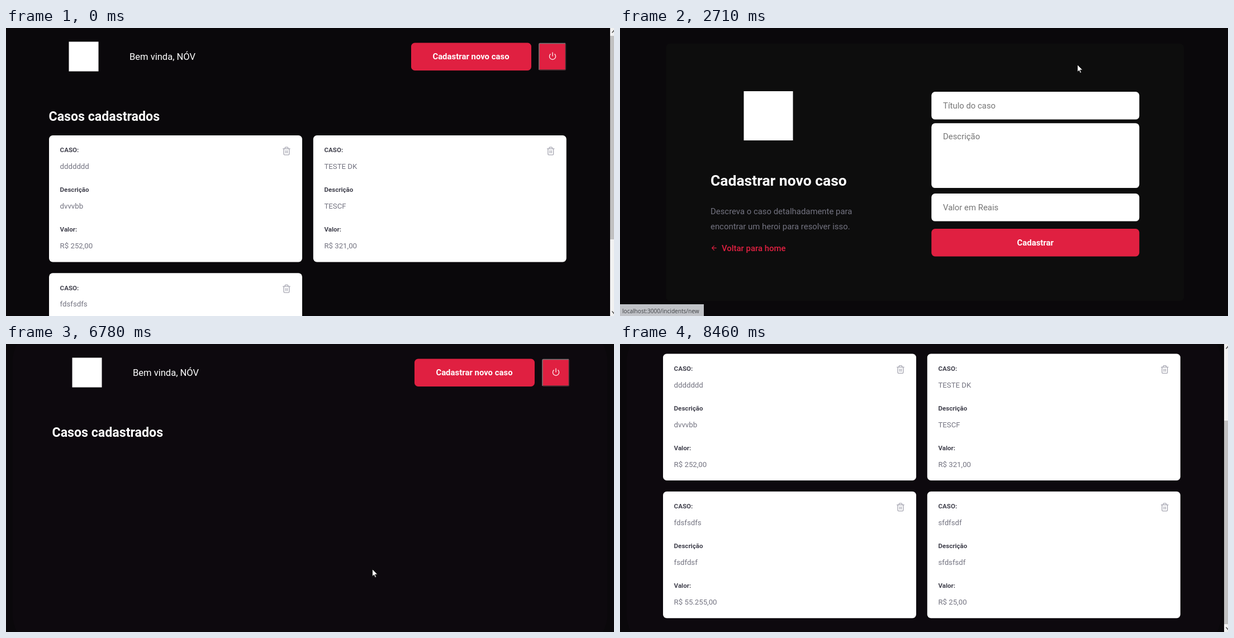
Write an HTML page that moves like this. It is 1088 px wide and 515 px high and loops after 9.42 s.

```html
<!DOCTYPE html>
<html lang="pt-BR">
<head>
<meta charset="utf-8">
<title>Casos cadastrados</title>
<style>
  html, body { margin: 0; width: 100%; height: 100%; overflow: hidden; background: #0a080b; }
  svg { display: block; }
  text { font-family: Roboto, sans-serif; font-size: 14.9px; fill: #fff; white-space: pre; }
  .bold { font-weight: 700; }
  .label { font-size: 11.58px; font-weight: 700; fill: #41414d; }
  .value { font-size: 13.23px; fill: #737380; }
  .icon { fill: none; stroke-width: 2; stroke-linecap: round; stroke-linejoin: round; }
  .red { fill: #e02041; }
  .cursor { fill: #fff; stroke: #111; stroke-width: 1; stroke-linejoin: round; }
</style>
</head>
<body>
<svg id="stage" width="1088" height="515" viewBox="0 0 1088 515"></svg>
<script>
const LOOP = 9420, FRAME = 78;
const OPEN_FORM = 2710, SUBMIT = 6780, LOADED = 6870;
const ICON = {
  trash: 'M3 6h18M19 6v14a2 2 0 0 1-2 2H7a2 2 0 0 1-2-2V6m3 0V4a2 2 0 0 1 2-2h4a2 2 0 0 1 2 2v2M10 11v6M14 11v6',
  power: 'M18.36 6.64a9 9 0 1 1-12.73 0M12 2v10',
  back: 'M19 12H5M12 19l-7-7 7-7'
};
const CASES = [
  ['ddddddd', 'dvvvbb', '252,00'],
  ['TESTE DK', 'TESCF', '321,00'],
  ['fdsfsdfs', 'fsdfdsf', '55.255,00'],
  ['sfdfsdf', 'sfdsfsdf', '25,00']
];

const text = (x, y, content, attrs = '') => `<text x="${x}" y="${y}" ${attrs}>${content}</text>`;
const box = (x, y, w, h, attrs = 'fill="#fff"') =>
  `<rect x="${x}" y="${y}" width="${w}" height="${h}" rx="6.6" ${attrs}/>`;
const icon = (name, x, y, size, color) =>
  `<path class="icon" stroke="${color}" transform="translate(${x} ${y}) scale(${size / 24})" d="${ICON[name]}"/>`;
const logo = (cx, cy, size) =>
  `<rect x="${cx - size / 2}" y="${cy - size / 2}" width="${size}" height="${size}" fill="#fff"/>`;

function card([title, description, amount], i) {
  const rows = [['CASO:', title], ['Descrição', description], ['Valor:', 'R$ ' + amount]];
  return `<g id="card${i}" transform="translate(${77 + i % 2 * 472.8} ${192 + (i >> 1) * 246.3})">
    ${box(0, 0, 453, 226.4)}
    ${rows.map(([label, value], row) =>
      text(19.6, 30.4 + row * 71, label, 'class="label"') +
      text(19.6, 60 + row * 71, value, 'class="value"')).join('')}
    ${icon('trash', 416.7, 19.7, 16.54, '#a8a8b3')}
  </g>`;
}

const home = `<g id="home">
  ${logo(139, 51, 53)}
  ${text(221, 57, 'Bem vinda, NÓV', 'style="font-size:16.54px"')}
  ${box(725, 26.5, 215, 49.5, 'class="red"')}
  ${box(725, 26.5, 215, 49.5, 'id="newHover"')}
  ${text(832, 56.3, 'Cadastrar novo caso', 'class="bold" text-anchor="middle"')}
  <rect x="953.5" y="27" width="48.5" height="48.5" rx="3" class="red"/>
  <path d="M954 75V29q0-1.5 1.5-1.5H1001" fill="none" stroke="#767676" stroke-width="1.5"/>
  <path d="M954.5 75H1000q1.5 0 1.5-1.5V28" fill="none" stroke="#3c3236" stroke-width="1.5"/>
  ${icon('power', 970.6, 42.6, 14.9, '#fff')}
  ${text(76.5, 166.3, 'Casos cadastrados', 'class="bold" style="font-size:23.16px"')}
  <g id="cards">${CASES.map(card).join('')}</g>
</g>
<g id="scrollbar">
  <rect x="1081" width="14" height="515" fill="#f1f1f1"/>
  <rect id="thumb" x="1081" y="14" width="14" height="364" fill="#c1c1c1"/>
  <path d="M1084.5 8.5l3.5-4 3.5 4M1084.5 506.5l3.5 4 3.5-4" fill="none" stroke="#505050" stroke-width="1.5"/>
</g>`;

const form = `<g id="form">
  ${box(82.5, 28, 926.5, 460, 'fill="#0d0d0d"')}
  ${logo(265.5, 157, 88)}
  ${text(162, 282, 'Cadastrar novo caso', 'class="bold" style="font-size:26.46px"')}
  ${text(162, 333.2, 'Descreva o caso detalhadamente para', 'style="fill:#737380"')}
  ${text(162, 359.7, 'encontrar um heroi para resolver isso.', 'style="fill:#737380"')}
  ${icon('back', 161.8, 386.8, 13.2, '#e02041')}
  ${text(182, 398.5, 'Voltar para home', 'class="red" style="font-weight:500;fill:#e02041"')}
  ${box(557.3, 114, 372, 49.6)}${box(557.3, 170.3, 372, 115.8)}${box(557.3, 296, 372, 49.6)}
  ${text(578, 144, '', 'id="title"')}
  ${text(578, 199.3, '', 'id="description"')}
  ${text(578, 326, '', 'id="amount"')}
  ${box(557.3, 359, 372, 49.4, 'class="red"')}
  ${box(557.3, 359, 372, 49.4, 'id="saveHover"')}
  ${text(743.3, 388.6, 'Cadastrar', 'class="bold" text-anchor="middle"')}
</g>`;

const overlay = `<g id="status">
  <rect y="494" width="150" height="21" fill="#dee1e6"/>
  ${text(4, 510, 'localhost:3000/incidents/new', 'style="font:10.1px \'Open Sans\',sans-serif;fill:#4a4d51"')}
</g>
<g id="pointer">
  <path id="arrow" class="cursor" d="M.5 .5v13.2l3-2.8 2 4.6 2.1-.9-2-4.5h4.3z"/>
  <path id="ibeam" d="M-2.5-6h2l.5.6.5-.6h2M0-5.4V5.4M-2.5 6h2l.5-.6.5.6h2" fill="none" stroke="#111"/>
  <path id="hand" class="cursor" d="M-1.5 11V1.5q1.5-2 3 0V7l6.5 1.3q2 .6 2 2.7v4.5l-2 5.5H0l-5-7.5q-.8-2.5 1.5-2.2z"/>
</g>`;

document.getElementById('stage').innerHTML = `<rect width="1088" height="515" fill="#0a080b"/>
  <rect id="halo" x="12" y="-30" width="1064" height="575" rx="60" fill="#0d090e"/>` + home + form + overlay;

// Each path is a stretch of time in which the pointer is visible: [time, x, y].
const PATHS = [
  [[470, 1078, 511], [600, 1058, 501], [1070, 1058, 501], [1700, 828, 186], [2010, 813, 36],
   [2090, 813, 54], [2480, 813, 54], [2540, 818, 62], [2700, 818, 62], [2710, 818, 65],
   [2790, 818, 65], [3260, 608, 138], [3570, 608, 138]],
  [[4120, 612, 160], [4200, 618, 210], [4430, 618, 210]],
  [[5040, 622, 230], [5290, 629, 317], [5820, 629, 317]],
  [[6390, 632, 335], [6620, 655, 402], [7180, 655, 402], [7330, 652, 361], [7550, 652, 361]],
  [[7870, 652, 361], [8100, 652, 361], [8180, 600, 375], [8390, 1073, 468], [8460, 1073, 468]]
];

const $ = id => document.getElementById(id);
const ramp = (t, from, to) => Math.min(1, Math.max(0, (t - from) / (to - from)));
const show = (id, visible) => { $(id).style.display = visible ? '' : 'none'; };

function pointerAt(t) {
  const path = PATHS.find(p => t >= p[0][0] && t < p[p.length - 1][0]);
  if (!path) return null;
  const i = path.findIndex(key => key[0] > t);
  const [t0, x0, y0] = path[i - 1], [t1, x1, y1] = path[i];
  const k = Math.floor((t - t0) / FRAME) * FRAME / (t1 - t0);
  return { x: x0 + (x1 - x0) * k, y: y0 + (y1 - y0) * k };
}

function pointerShape({ x, y }, onForm) {
  if (!onForm) return x > 725 && x < 940 && y > 26 && y < 76 ? 'hand' : 'arrow';
  if (x < 557 || x > 929) return 'arrow';
  if (y >= 359 && y <= 408) return 'hand';
  const inField = [[114, 163], [170, 286], [296, 345]].some(([top, bottom]) => y >= top && y <= bottom);
  return inField ? 'ibeam' : 'arrow';
}

function typeInto(id, t, start, step, content, placeholder) {
  const count = Math.max(0, Math.floor((t - start) / step) + 1);
  $(id).textContent = count ? content.slice(0, count) : placeholder;
  $(id).style.fill = count ? '#333' : '#757575';
}

function scrollAt(t) {
  if (t < 7410) return 0;
  return t < 7470 ? 12.4 : t < 7550 ? 100 : 174.5;
}

function render(t) {
  const onForm = t >= OPEN_FORM && t < SUBMIT;
  const empty = t >= SUBMIT && t < LOADED;
  const scroll = scrollAt(t);

  show('halo', t >= SUBMIT);
  show('home', !onForm);
  show('form', onForm);
  show('scrollbar', !onForm && !empty);
  show('cards', !empty);
  show('card3', t >= LOADED);
  $('home').setAttribute('transform', `translate(${empty ? 6 : 0} ${-scroll})`);
  $('thumb').setAttribute('y', 14 + scroll * 0.705);
  $('newHover').style.opacity = t < OPEN_FORM ? 0.1 * ramp(t, 2050, 2330) : 0;
  $('saveHover').style.opacity = 0.1 * ramp(t, 6500, 6700);
  $('status').style.opacity = t < OPEN_FORM ? ramp(t, 1930, 2330) : 0.86 * (1 - ramp(t, 2780, 2950));

  typeInto('title', t, 3570, FRAME, 'sfdfsdf', 'Título do caso');
  typeInto('description', t, 4430, FRAME, 'sfdsfsdf', 'Descrição');
  typeInto('amount', t, 5820, 170, '25', 'Valor em Reais');

  const pointer = pointerAt(t);
  show('pointer', pointer);
  if (!pointer) return;
  const shape = pointerShape(pointer, onForm);
  for (const id of ['arrow', 'ibeam', 'hand']) show(id, id === shape);
  $('pointer').setAttribute('transform', `translate(${pointer.x} ${pointer.y})`);
}

const start = performance.now();
function tick() {
  render((performance.now() - start) % LOOP);
  requestAnimationFrame(tick);
}
tick();
</script>
</body>
</html>
```
